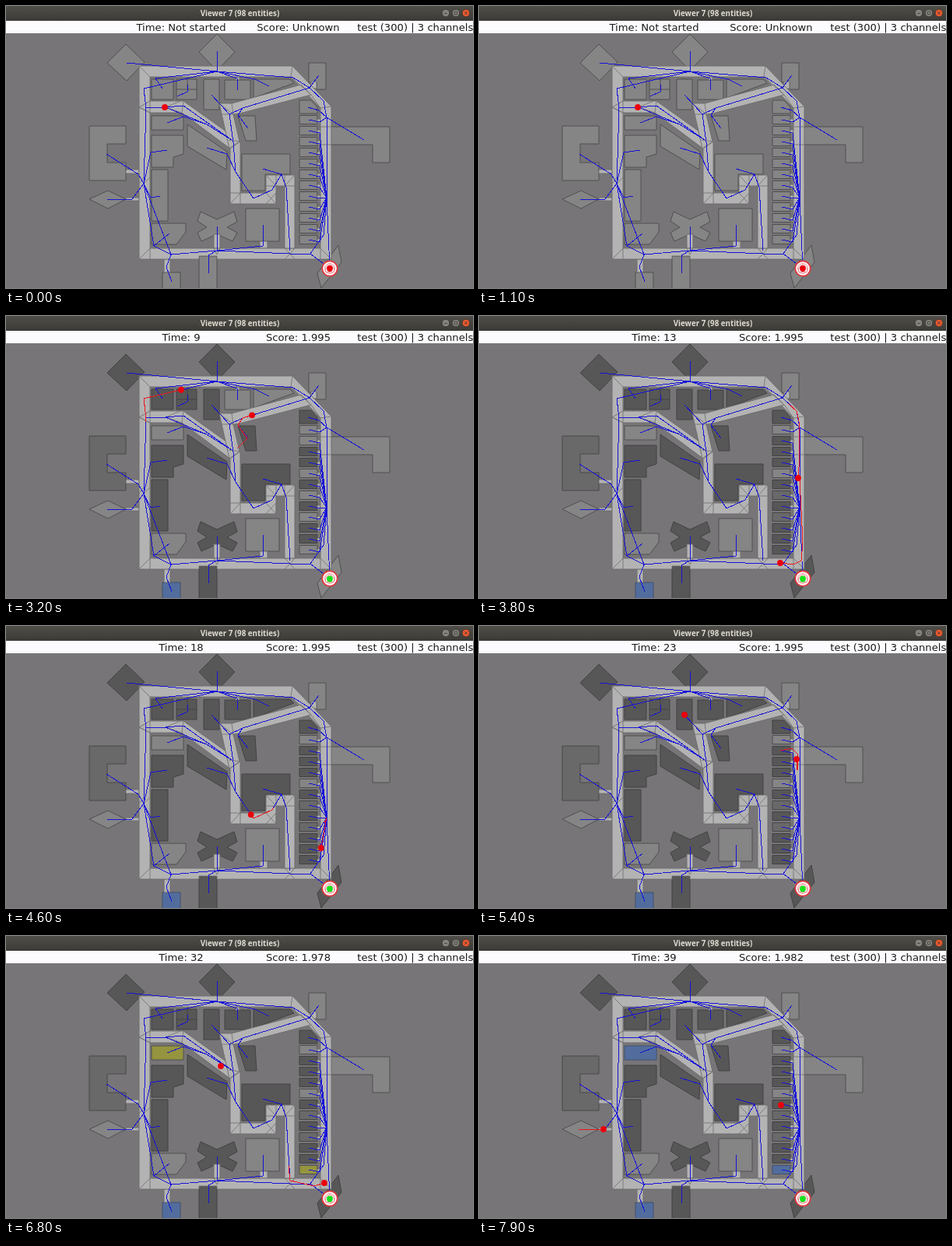
Animation of 600x362 px, one loop 8000 ms. Source, as an HTML page:

```html
<!DOCTYPE html>
<html lang="en">
<head>
<meta charset="utf-8">
<title>Viewer</title>
<style>
html, body { margin: 0; width: 100%; height: 100%; overflow: hidden; background: #777577; }
svg { display: block; width: 100vw; height: 100vh; }
.title { font: bold 9.75px "Open Sans", "Noto Sans", sans-serif; fill: #dfdbd2; text-anchor: middle; }
.status { font: 13.15px "DejaVu Sans", sans-serif; fill: #1c1c1c; text-anchor: middle; }
.town { fill: #858585; stroke: #505050; stroke-width: 1; }
.town .dark { fill: #575757; stroke: #424242; }
.town .dull { fill: #696969; stroke: #484848; }
.town .fire { fill: #95943f; }
.town .wet { fill: #526d9d; stroke: #41506c; }
.town .door, .roads { fill: #b3b3b3; stroke: #6c6c6c; stroke-width: .9; }
.seams { fill: none; stroke: #757575; stroke-width: .9; }
.links { fill: none; stroke: #1712d8; stroke-width: 1; shape-rendering: crispEdges; }
.trail { fill: none; stroke: #ee1620; stroke-width: 1; shape-rendering: crispEdges; }
.agent { fill: #ea000c; }
</style>
</head>
<body>
<svg viewBox="0 0 600 362" preserveAspectRatio="none">
  <defs>
    <linearGradient id="bar" x2="0" y2="1">
      <stop stop-color="#504e48"/><stop offset="1" stop-color="#3b3a36"/>
    </linearGradient>
  </defs>
  <rect width="600" height="362" fill="#777577"/>

  <!-- data-dark, data-dull: step from which the building takes that shade -->
  <g class="town" id="town">
    <path data-dark="0" d="M130 73L154 49L178 72L155 96Z"/>
    <path data-dark="0" d="M271 36L294 59L271 83L248 59Z"/>
    <path d="M389 73H411V107H399V98H389Z"/>
    <path d="M414 155H493V201H471V178H414Z"/>
    <path data-dull="7" d="M107 154H154V177H130V201H154V224H107Z"/>
    <path d="M107 248L131 237L154 248L131 260Z"/>
    <path data-dark="10" d="M427 307L431 329L405 362L400 343Z"/>
    <path id="south" d="M201 342H224V364H201Z"/>
    <path data-dark="0" d="M248 321H271V364H248Z"/>
    <path data-dark="0" d="M187 94H215V120H187Z"/>
    <path data-dark="9" d="M219 94H245V120H219ZM219 107H245M233 94V107"/>
    <path data-dark="0" d="M254 94H274V133H254Z"/>
    <path data-dark="10" d="M281 95H314V120H281Z"/>
    <path data-dark="11" d="M318 94H365L370 99L318 118Z"/>
    <path data-dark="8" d="M298 141H320L322 173H308Z"/>
    <path id="west" d="M187 141H228V159H187Z"/>
    <path data-dark="0" d="M187 166H228V190L215 194V207H187Z"/>
    <path data-dark="0" d="M233 152L284 187L283 210L233 180Z"/>
    <path data-dark="7" d="M187 210H208V276H187Z"/>
    <path d="M187 279H231V290L219 306H187Z"/>
    <path data-dark="0" d="M250 264L271 274L293 264L297 277L284 284L297 291L291 302L271 293L251 302L246 291L258 284L246 276Z"/>
    <path d="M308 260H351V302H308Z"/>
    <path data-dark="0" d="M303 190H365V216H333V237H303Z"/>
    <path data-dark="0" d="M377 121H392L400 130V138H377Z"/>
  </g>

  <g class="roads">
    <path d="M154 210H171V215H154ZM154 246H171V250H154ZM203 325H211V342H203ZM267 293H275V311H267ZM326 302H336V311H326ZM295 91H300V95H295ZM392 97H399V106H392Z"/>
    <path fill-rule="evenodd" d="M171 77H368L418 129V325H271V321H248V325H171ZM185 91V311H404V131L366 91Z"/>
    <path d="M171 130L185 122H228L301 174V240H334V217H371V311H358V231H347V254H288V183L226 137H185Z"/>
    <path d="M274 125H290L379 101L392 114L300 138L292 139L300 174L287 183Z"/>
  </g>
  <path class="seams" d="M171 77L185 91M171 325L185 311V325M418 325L404 311V325M366 91L368 77M366 91L392 114L379 101M404 131L418 129M404 155H418M404 178H418M185 122V137L171 130M224 122L205 130L226 137L228 122M286 172L301 174L288 183M274 125L292 139L290 125M275 139L292 139M288 240H301L288 254M301 240V254M334 240L347 254V240L334 254M334 217L347 231H334M371 217L358 231H371M347 217V231M358 217V231M358 311L365 318L371 311M358 325L365 318L371 325M267 311L271 319L275 311M177 220L171 228M177 228L185 220M392 114L404 131"/>

  <g class="links">
    <path d="M155 73L271 84V58M271 84L177 106L180 131L177 228M271 84L192 93L201 106M233 101V110L220 116M271 84L297 93V108M271 84L320 94L338 103M271 84L369 92L390 105"/>
    <path d="M180 130H205L258 152L290 172M205 130L228 128L290 172M207 150L228 142L258 152M264 114L287 139L304 131L390 105M304 131L298 140L311 157M287 139L292 175L295 213L318 247L342 236L354 216L330 209M354 216L360 233L365 314M258 182L284 190L295 213"/>
    <path d="M402 89L390 105L408 122L412 143L460 172M388 130L402 134L412 143V246L416 337L391 318L408 294L412 246"/>
    <path d="M129 190L170 216L177 228L162 248H130M177 228L186 188L207 185M177 228L186 246L198 244M177 228L190 308L210 292M177 228L212 319L190 308M212 319L206 335L213 354M212 319L271 314V283M271 314L260 320V343M271 314L330 308V281M271 314L365 318L391 319"/>
    <path id="fan"/>
  </g>

  <g>
    <circle cx="416" cy="337" r="9.7" fill="#fff" stroke="#e0383f" stroke-width="1.8"/>
    <circle cx="416" cy="337" r="6.6" fill="#f6dcdd" stroke="#eba2a6"/>
    <path d="M410.5 337L416 331.5L421.5 337V341.5H410.5Z" fill="#fff" stroke="#d9666c" stroke-width=".7"/>
    <circle id="saved" cx="416" cy="337.5" r="3.9" fill="#17e21c"/>
  </g>
  <g id="agents"></g>

  <rect width="600" height="19" fill="url(#bar)"/>
  <text class="title" x="300.5" y="12.5">Viewer 7 (98 entities)</text>
  <g fill="#85837b" stroke="#33322e" stroke-width=".7">
    <circle cx="565" cy="9" r="4.8"/><circle cx="578" cy="9" r="4.8"/>
    <circle cx="591" cy="9" r="4.8" fill="#e9592e"/>
    <path d="M563 9.5H567M576.2 7.2H579.8V10.8H576.2ZM589.2 7.2L592.8 10.8M592.8 7.2L589.2 10.8" fill="none"/>
  </g>
  <rect y="19" width="600" height="16" fill="#fcfbfd"/>
  <g class="status">
    <text id="time" x="225" y="32"></text>
    <text id="score" x="375.5" y="32"></text>
    <text x="525.8" y="32">test (300) | 3 channels</text>
  </g>
</svg>
<script>
const LOOP = 8000, STEP = 160, START = 1650;
const $ = id => document.getElementById(id);

function add(parent, tag, attrs) {
  const el = document.createElementNS("http://www.w3.org/2000/svg", tag);
  for (const key in attrs) el.setAttribute(key, attrs[key]);
  return parent.appendChild(el);
}

const houses = [...$("town").children];

// The row of small houses along the eastern road
const rowDark = { 1: 12, 2: 0, 3: 0, 5: 0, 7: 0, 9: 0, 10: 0, 11: 12 };
const rowDull = { 6: 12, 8: 12 };
let fan = "";
for (let i = 0; i < 12; i++) {
  const y = 146 + 14 * i;
  const house = add($("town"), "path", { d: `M377 ${y - 5.5}h23v11h-23Z` });
  if (i in rowDark) house.dataset.dark = rowDark[i];
  if (i in rowDull) house.dataset.dull = rowDull[i];
  if (i === 11) house.id = "east";
  houses.push(house);
  add($("town"), "path", { class: "door", d: `M400 ${y - 1}h4v5h-4Z` });
  fan += `M389 ${y}L403 ${y + 3}L412 ${i ? 246 : 143}`;
}
$("fan").setAttribute("d", fan);

// Legs of each walk: first step, last step, way
const walks = [
  [
    [0, 4, "M204 130H180L177 228L180 323"],
    [5, 12, "M180 323L177 228L197 244L177 228L180 131L177 106L271 84L298 107L320 94L343 105L320 94L397 112"],
    [12, 13, "M397 112L408 122L411 135L412 180L410 208"],
    [13, 22, "M410 208L404 219L389 217L404 219L412 246L404 234L389 231L404 234L412 246L404 261L389 258L404 261L412 246L404 289L389 300L412 246V180L402 157L387 160"],
    [22, 23, "M387 160L402 157L409 164V185L408 171"],
    [23, 31, "M408 171L412 246L408 294L391 318L365 314V231L354 216L365 225L363 295"],
    [31, 32, "M363 295L365 314L396 321L409 317"],
    [33, 37, "M409 317L412 246L404 219L388 217"]
  ],
  [
    [0, 4, "M416 337L391 318L365 314V225L354 216L330 209"],
    [4, 5, "M330 209L354 216L366 220L365 264"],
    [5, 12, "M365 264V225L354 216L342 236L318 247L295 213L292 175L310 157L298 140L304 131L390 105L411 135L412 210"],
    [12, 13, "M412 210L416 290L414 314L404 319L387 317"],
    [13, 22, "M387 317L365 314V231L354 216L342 236L318 247L295 213L287 139L264 114"],
    [24, 26, "M264 114L287 139L292 175L276 167"],
    [33, 38, "M276 167L226 137L204 130H180L177 228L162 248H128"],
    [38, 39, "M128 248H160"]
  ]
];
const agents = walks.map(legs => ({
  legs,
  trail: add($("agents"), "path", { class: "trail" }),
  dot: add($("agents"), "circle", { class: "agent", r: 3.9 })
}));

function place({ legs, trail, dot }, step) {
  const [from, to, way] = legs.filter(leg => leg[0] < step).pop() || legs[0];
  trail.setAttribute("d", way);
  const length = trail.getTotalLength();
  const along = s => length * Math.min(1, Math.max(0, (s - from) / (to - from)));
  const begin = along(step - 1), end = along(step);
  const p = trail.getPointAtLength(end);
  dot.setAttribute("cx", p.x);
  dot.setAttribute("cy", p.y);
  trail.style.strokeDasharray = `0 ${begin} ${end - begin} ${length + 1}`;
  trail.style.visibility = end > begin ? "visible" : "hidden";
}

// Houses that burn and are then put out
const fires = { south: [2, 5], west: [27, 35], east: [27, 35] };

function look(el, step) {
  if (step < 0) return "";
  const fire = fires[el.id];
  if (fire && step >= fire[0]) return step < fire[1] ? "fire" : "wet";
  return ["dark", "dull"].find(shade => el.dataset[shade] <= step) || "";
}

let shown;
function show(step) {
  if (step === shown) return;
  shown = step;
  const on = step >= 0;
  $("time").textContent = "Time: " + (on ? step : "Not started");
  $("score").textContent = "Score: " + (!on ? "Unknown" : step < 28 ? "1.995" : step < 35 ? "1.978" : "1.982");
  $("saved").style.visibility = on ? "visible" : "hidden";
  houses.forEach(el => el.setAttribute("class", look(el, step)));
  agents.forEach(agent => place(agent, Math.max(0, step)));
}

function frame() {
  const t = performance.now() % LOOP;
  show(Math.max(-1, Math.floor((t - START) / STEP)));
  requestAnimationFrame(frame);
}
frame();
</script>
</body>
</html>
```
